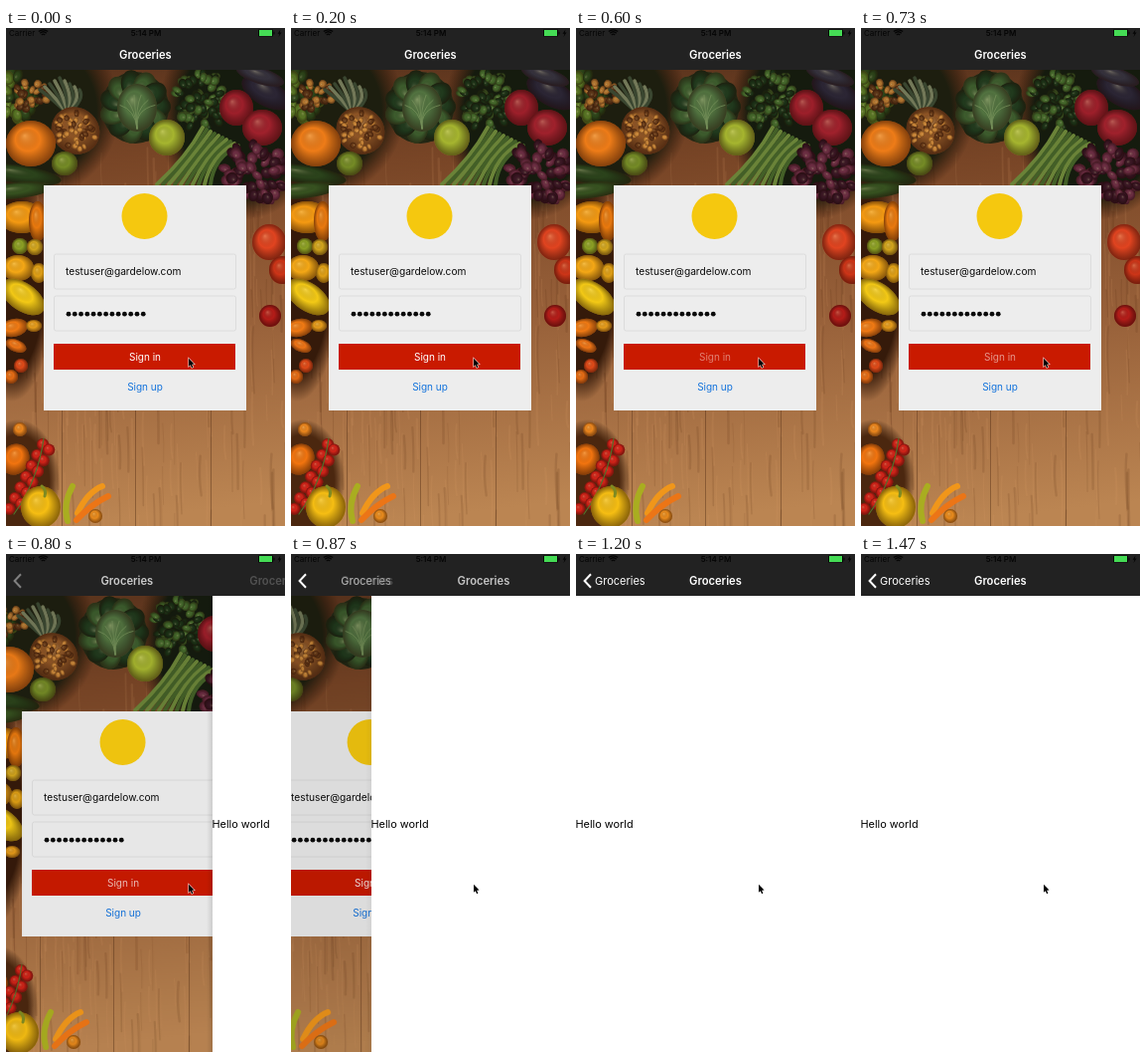
An HTML page with a canvas for the animation above (1.54 s loop, 281x500 px).

```html
<!DOCTYPE html>
<html lang="en">
<head>
<meta charset="utf-8">
<title>Groceries sign in</title>
<style>
  html, body { margin: 0; width: 100%; height: 100%; overflow: hidden; background: #222; }
  canvas { display: block; width: 281px; height: 500px; }
</style>
</head>
<body>
<canvas id="stage"></canvas>
<script>
const W = 281, H = 500, BAR = 42, LOOP = 1540, STEP = 200 / 3;
const FONT = 'Inter, "Liberation Sans", sans-serif';
const scale = Math.max(1, window.devicePixelRatio || 1);

function makeCanvas(el) {
  el.width = Math.round(W * scale);
  el.height = Math.round(H * scale);
  const g = el.getContext('2d');
  g.scale(scale, scale);
  return g;
}

const c = makeCanvas(document.getElementById('stage'));
const photo = document.createElement('canvas');
drawPhoto(makeCanvas(photo));

const clamp = v => Math.max(0, Math.min(1, v));

// Critically damped push that begins at `start`.
function spring(t, start) {
  const x = Math.max(0, t - start) * 0.0225;
  return 1 - (1 + x) * Math.exp(-x);
}

function blob(g, color, x, y, rx, ry = rx, turn = 0) {
  g.save();
  g.translate(x, y);
  g.rotate(turn);
  g.scale(rx, ry);
  g.beginPath();
  g.arc(0, 0, 1, 0, 7);
  g.fillStyle = color;
  g.fill();
  const shade = g.createRadialGradient(-0.25, -0.35, 0, 0, 0, 1);
  shade.addColorStop(0, 'rgba(255,245,190,.28)');
  shade.addColorStop(0.5, 'rgba(0,0,0,0)');
  shade.addColorStop(1, 'rgba(30,5,0,.5)');
  g.fillStyle = shade;
  g.fill();
  g.restore();
}

// Soft dark patch under a heap of food.
function shadow(g, color, x, y, rx, ry) {
  g.save();
  g.translate(x, y);
  g.scale(rx, ry);
  const fade = g.createRadialGradient(0, 0, 0.75, 0, 0, 1);
  fade.addColorStop(0, color);
  fade.addColorStop(1, 'rgba(40,18,6,0)');
  g.fillStyle = fade;
  g.fillRect(-1, -1, 2, 2);
  g.restore();
}

function streak(g, color, width, x, y, cx, cy, x2, y2) {
  g.beginPath();
  g.moveTo(x, y);
  g.quadraticCurveTo(cx, cy, x2, y2);
  g.strokeStyle = color;
  g.lineWidth = width;
  g.lineCap = 'round';
  g.stroke();
}

function drawPhoto(g) {
  let seed = 11;
  const rnd = () => (seed = seed * 16807 % 2147483647) / 2147483647;

  // Many small spots in two tones inside an ellipse.
  function scatter(count, light, dark, x, y, rx, ry, size) {
    for (let i = 0; i < count; i++) {
      const a = rnd() * 6.283, r = Math.sqrt(rnd());
      blob(g, i % 2 ? light : dark, x + Math.cos(a) * r * rx, y + Math.sin(a) * r * ry,
        size, size * (0.6 + rnd() * 0.4), a);
    }
  }

  const wood = g.createLinearGradient(0, BAR, 50, H);
  wood.addColorStop(0, '#5b341d');
  wood.addColorStop(0.22, '#784526');
  wood.addColorStop(0.6, '#98613a');
  wood.addColorStop(1, '#bb8552');
  g.fillStyle = wood;
  g.fillRect(0, 0, W, H);
  for (let i = 0; i < 260; i++) {
    const x = rnd() * W, y = 120 + rnd() * 370, tone = rnd() < 0.5 ? '70,30,8' : '225,165,110';
    streak(g, `rgba(${tone},.13)`, 0.6 + rnd() * 2, x, y, x + rnd() * 4 - 2, y + 20, x + 1, y + 25 + rnd() * 45);
  }
  g.fillStyle = 'rgba(55,25,8,.35)';
  for (const x of [56, 130, 206]) g.fillRect(x, 384, 1, 116);

  shadow(g, '#1d1e0f', 20, 82, 95, 92);
  shadow(g, '#151b0e', 238, 88, 85, 105);
  shadow(g, '#351a0a', 6, 260, 42, 115);
  shadow(g, '#4b270f', 12, 455, 42, 62);

  // top left
  scatter(30, '#587523', '#2c4318', 6, 68, 22, 24, 7);
  blob(g, '#2b431b', 14, 147, 42, 9, 0.15);
  blob(g, '#375220', 12, 163, 34, 8, -0.1);
  scatter(26, '#b57730', '#5c3517', 24, 68, 18, 15, 4);
  for (let i = 0; i < 9; i++) {
    streak(g, i % 2 ? '#727858' : '#3a4630', 3.5, 62, 86, 48 + i * 4, 72, 34 + i * 5, 50 + Math.abs(i - 4) * 3);
  }
  blob(g, '#8e5425', 70, 103, 25, 23, 0.6);
  scatter(60, '#cc8637', '#6d3d19', 70, 103, 22, 20, 3);
  blob(g, '#ee7c18', 25, 116, 25, 23);
  blob(g, '#758b26', 59, 136, 13, 12);

  // cabbage
  blob(g, '#2a4424', 130, 80, 34, 36);
  for (let i = 0; i < 11; i++) {
    const a = i * 0.571;
    blob(g, i % 2 ? '#3d5c2d' : '#213a1d', 130 + Math.cos(a) * 22, 79 + Math.sin(a) * 23, 14, 11, a);
  }
  blob(g, '#527340', 132, 80, 20, 24);
  for (let i = 0; i < 6; i++) {
    streak(g, '#75905a', 0.8, 132, 101, 130, 82, 115 + i * 7, 65 + Math.abs(i - 2.5) * 5);
  }

  // top right
  scatter(75, '#44682a', '#1c3116', 196, 73, 27, 29, 5);
  blob(g, '#2b2534', 262, 65, 27, 13, 0.5);
  blob(g, '#35313c', 256, 48, 25, 8, 0.3);
  blob(g, '#9d1f2a', 232, 80, 17, 18);
  blob(g, '#a0212c', 258, 100, 20, 18);
  for (let i = 0; i < 10; i++) {
    streak(g, i % 2 ? '#435f27' : '#6a8338', 4, 152 + i * 6, 157, 182 + i * 3, 130, 198 + i * 4, 100 + i * 2);
  }
  blob(g, '#a6b52f', 162, 110, 18, 18);
  scatter(65, '#6c2d42', '#3a1623', 250, 146, 33, 30, 6);

  // right side
  blob(g, '#e14420', 265, 215, 17, 18);
  blob(g, '#cd3518', 278, 243, 13, 14);
  blob(g, '#b41c18', 266, 289, 11);

  // left side
  blob(g, '#f59a12', 16, 190, 23, 16);
  blob(g, '#e9790e', 32, 194, 9, 20);
  blob(g, '#8ca024', 14, 219, 8);
  blob(g, '#d3a51d', 29, 220, 8);
  blob(g, '#f5a816', 12, 241, 16, 13);
  blob(g, '#e1a015', 33, 246, 8, 10);
  blob(g, '#f3c916', 17, 270, 25, 14, 0.6);
  blob(g, '#f07a14', 8, 301, 14, 9, -0.2);
  blob(g, '#e69b1a', 28, 299, 8, 6);
  blob(g, '#ee7416', 10, 319, 11, 6, 0.4);
  blob(g, '#e04a18', 15, 339, 7);
  blob(g, '#e56b14', 5, 350, 7);

  // bottom corner
  blob(g, '#ec861e', 14, 403, 7);
  blob(g, '#f2740f', 9, 433, 14, 16, 0.5);
  for (let i = 0; i < 13; i++) {
    blob(g, '#d22318', 41 - i * 2.8 + (i % 2 ? 5 : -4), 418 + i * 5.4, 6);
  }
  streak(g, '#53702b', 1.2, 38, 412, 32, 455, 8, 488);
  blob(g, '#f6be13', 35, 481, 20, 21);
  streak(g, '#7e8a22', 3, 36, 460, 41, 464, 39, 470);
  streak(g, '#a9ad20', 6, 67, 460, 57, 478, 62, 495);
  streak(g, '#f0961a', 6, 97, 460, 82, 466, 72, 487);
  streak(g, '#ec7516', 6, 103, 470, 86, 478, 71, 494);
  blob(g, '#e98a1c', 90, 490, 7);
}

function text(str, x, y, size, color, { weight = 400, align = 'left', alpha = 1 } = {}) {
  if (alpha <= 0) return;
  c.save();
  c.globalAlpha *= alpha;
  c.font = `${weight} ${size}px ${FONT}`;
  c.textAlign = align;
  c.fillStyle = color;
  c.fillText(str, x, y + size * 0.364);
  c.restore();
}

function field(y) {
  c.beginPath();
  c.roundRect(48.5, y + 0.5, 183, 35, 2);
  c.strokeStyle = '#dcdcdc';
  c.lineWidth = 1;
  c.stroke();
}

function drawLogin(labelAlpha) {
  c.drawImage(photo, 0, 0, W, H);
  c.fillStyle = '#ededed';
  c.fillRect(38, 158, 204, 226);
  c.beginPath();
  c.arc(139.5, 189, 23, 0, 7);
  c.fillStyle = '#f5c80f';
  c.fill();
  field(226.5);
  field(268.5);
  text('testuser@gardelow.com', 60, 244.5, 10.2, '#0a0a0a');
  c.fillStyle = '#0a0a0a';
  for (let i = 0; i < 13; i++) {
    c.beginPath();
    c.arc(63 + i * 6.27, 287.2, 2.4, 0, 7);
    c.fill();
  }
  c.fillStyle = '#c91a00';
  c.fillRect(48, 317, 183, 26);
  text('Sign in', 140, 330, 10, '#fff', { align: 'center', alpha: labelAlpha });
  text('Sign up', 140, 360, 10, '#1473dc', { align: 'center' });
}

function drawPage(x, p) {
  const edge = c.createLinearGradient(x - 6, 0, x, 0);
  edge.addColorStop(0, 'rgba(0,0,0,0)');
  edge.addColorStop(1, `rgba(0,0,0,${0.16 * (1 - p)})`);
  c.fillStyle = edge;
  c.fillRect(x - 6, BAR, 6, H - BAR);
  c.fillStyle = '#fff';
  c.fillRect(x, BAR, W - x + 1, H - BAR);
  text('Hello world', x - 0.5, 271.5, 10.9, '#000');
}

function drawStatus() {
  text('Carrier', 3, 5.2, 8, '#050505');
  text('5:14 PM', 141, 5.2, 8, '#050505', { align: 'center', weight: 600 });
  c.strokeStyle = '#050505';
  c.lineWidth = 1.3;
  for (const r of [2.5, 4.8, 7]) {
    c.beginPath();
    c.arc(37.5, 8.8, r, -2.3, -0.84);
    c.stroke();
  }
  c.fillStyle = '#050505';
  c.fillRect(254, 1.6, 15, 6.8);
  c.fillRect(269.5, 3.8, 1, 2.6);
  c.fillStyle = '#45dc55';
  c.fillRect(255, 2, 13, 6);
  c.fillStyle = '#050505';
  c.beginPath();
  c.moveTo(276.5, 1.5);
  c.lineTo(273.5, 5.8);
  c.lineTo(275.4, 5.8);
  c.lineTo(274.5, 9);
  c.lineTo(277.6, 4.6);
  c.lineTo(275.8, 4.6);
  c.fill();
}

function drawBar(q) {
  c.fillStyle = '#222';
  c.fillRect(0, 0, W, BAR);
  drawStatus();
  const titleX = 114, oldX = titleX - 95 * q;
  text('Groceries', oldX, 27.3, 11.2, '#fff', { weight: 600, alpha: clamp(1 - q * 1.2) });
  if (q <= 0) return;
  text('Groceries', oldX, 27.3, 11, '#fff', { alpha: clamp(q * 1.3 - 0.3) });
  text('Groceries', titleX + 163 * (1 - q), 27.3, 11.2, '#fff', { weight: 600, alpha: clamp(q * 1.1) });
  c.save();
  c.globalAlpha = clamp(q * 2.2);
  c.beginPath();
  c.moveTo(15, 20.3);
  c.lineTo(8.6, 27);
  c.lineTo(15, 33.7);
  c.strokeStyle = '#fff';
  c.lineWidth = 2;
  c.stroke();
  c.restore();
}

function drawCursor() {
  c.save();
  c.translate(184, 331.8);
  c.scale(0.88, 0.88);
  c.beginPath();
  c.moveTo(0, 0);
  c.lineTo(0, 9);
  c.lineTo(2, 7.2);
  c.lineTo(3.6, 10.6);
  c.lineTo(5, 9.9);
  c.lineTo(3.5, 6.7);
  c.lineTo(6.3, 6.5);
  c.closePath();
  c.strokeStyle = 'rgba(255,255,255,.8)';
  c.lineWidth = 1.4;
  c.stroke();
  c.fillStyle = '#000';
  c.fill();
  c.restore();
}

function render(time) {
  const t = Math.min(22, Math.floor((time + 4) / STEP)) * STEP;
  const p = spring(t, 756), q = spring(t, 764);
  const pressed = t > 599 ? 0.45 + 0.55 * clamp((t - 700) / 200) : 1;

  c.clearRect(0, 0, W, H);
  c.save();
  c.translate(-0.3 * W * p, 0);
  drawLogin(pressed);
  c.restore();
  if (p > 0) {
    c.fillStyle = `rgba(0,0,0,${0.1 * p})`;
    c.fillRect(0, BAR, W, H - BAR);
    // The page settles on whole pixels.
    drawPage(Math.round(W * (1 - p)), p);
  }
  drawBar(q);
  drawCursor();
}

const start = performance.now();
function tick() {
  render((performance.now() - start) % LOOP);
  requestAnimationFrame(tick);
}
tick();
</script>
</body>
</html>
```
